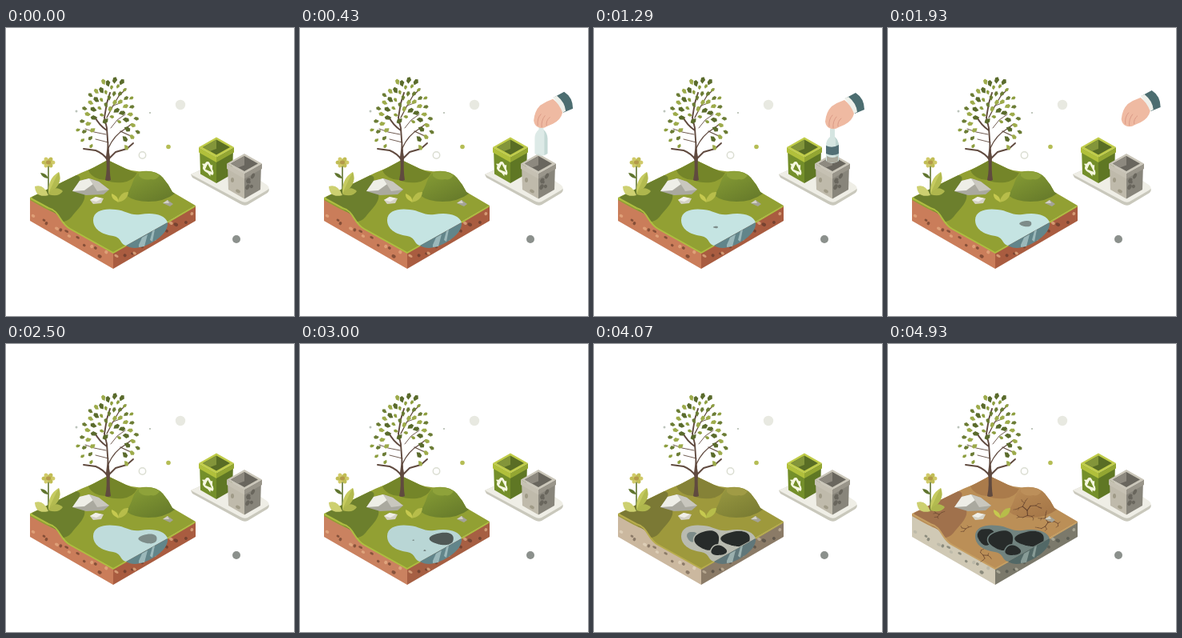
Animation of 360x360 px, one loop 5 s. Source, as an HTML page with a canvas:

```html
<!DOCTYPE html>
<html lang="en">
<head>
<meta charset="utf-8">
<title>Polluted ground</title>
<style>
html, body { margin: 0; width: 100%; height: 100%; overflow: hidden; background: #fff; }
canvas { display: block; width: 360px; height: 360px; }
</style>
</head>
<body>
<canvas id="stage" width="360" height="360"></canvas>
<script>
const ctx = document.getElementById('stage').getContext('2d');
const LOOP = 5000, STEPS = 70, TAU = Math.PI * 2;

const clamp = v => Math.max(0, Math.min(1, v));
const ramp = (t, a, b) => clamp((t - a) / (b - a));
const ease = v => v * v * (3 - 2 * v);
const lerp = (a, b, k) => a + (b - a) * k;

function seeded(seed) {
  return () => (seed = seed * 16807 % 2147483647) / 2147483647;
}

function mix(a, b, k) {
  const part = (c, i) => parseInt(c.slice(i, i + 2), 16);
  return '#' + [1, 3, 5].map(i =>
    Math.round(lerp(part(a, i), part(b, i), k)).toString(16).padStart(2, '0')).join('');
}

// Colour going from healthy through fading to dead
function decay(t, fresh, fading, dead, from = 3400) {
  return t < 4070 ? mix(fresh, fading, ramp(t, from, 4070)) : mix(fading, dead, ramp(t, 4070, 4850));
}

function fill(d, color) {
  ctx.fillStyle = color;
  ctx.fill(new Path2D(d));
}

function line(d, color, width) {
  ctx.strokeStyle = color;
  ctx.lineWidth = width;
  ctx.lineCap = ctx.lineJoin = 'round';
  ctx.stroke(new Path2D(d));
}

function oval(x, y, rx, ry, color, turn = 0) {
  ctx.fillStyle = color;
  ctx.beginPath();
  ctx.ellipse(x, y, rx, ry, turn, 0, TAU);
  ctx.fill();
}

const TOP = 'M30 212 L94 181 Q112 174 127 165 L150 176 Q160 180 170 179 Q187 177 196 187 Q203 195 208 205 L237 222 L134 281 L80 251 C70 245 70 234 61 231 Q52 228 30 215 Z';
const LEFT = 'M30 213 L53 225 C68 229 66 243 80 251 L134 281 V301 L30 241 Z';
const RIGHT = 'M134 281 L237 222 V241 L134 301 Z';
const POND = 'M109 240 C109 228 124 225 137 227 C150 228 155 235 168 233 C183 230 199 233 202 243 L150 272 C142 270 145 262 134 260 C119 258 109 251 109 240 Z';
const GLASS = 'M150 272 L202 243 C203 252 195 260 186 266 C173 274 160 278 150 272 Z';

const SLICKS = [
  { x: 121, y: 240, rx: 12, ry: 12, grow: [2950, 4850], dark: [4070, 4700] },
  { x: 141, y: 245, rx: 17, ry: 14, grow: [2700, 4100], dark: [3500, 4000] },
  { x: 179, y: 243, rx: 20, ry: 11, grow: [1130, 3450], dark: [2500, 3450] },
  { x: 156, y: 259, rx: 11, ry: 7.5, grow: [2700, 3700], dark: [2800, 3400] }
];

function drawPebbles(t, x0, x1, dark, pale, seed) {
  const random = seeded(seed);
  for (let i = 0; i < 13; i++) {
    const x = lerp(x0 + 4, x1 - 4, (i + random()) / 13);
    const y = 301 - Math.abs(x - 134) * .58 - 4 - random() * 12;
    oval(x, y, 1.5 + 1.5 * random(), 1.3 + random(), i % 3 ? dark : pale, .5);
  }
}

function drawSoil(t) {
  const soil = (...colors) => decay(t, ...colors, 2900);
  fill(LEFT, soil('#ca7d5a', '#cbb89f', '#d0c9b5'));
  fill(RIGHT, soil('#a95c40', '#8b7b67', '#7b796b'));
  drawPebbles(t, 30, 134, soil('#854f38', '#8b7a68', '#8c8c7e'), soil('#dfa078', '#ddceb7', '#bdbaa9'), 71);
  drawPebbles(t, 134, 237, soil('#774331', '#62594d', '#5c5e54'), soil('#d59a74', '#b6a68f', '#a7a594'), 29);
}

function drawGrass(t) {
  fill(TOP, decay(t, '#92a033', '#9e993c', '#bb8f57'));
  const mound = decay(t, '#6c7f2d', '#7b7935', '#a0714c');
  fill('M33 211 L88 184 C99 187 85 194 96 203 C104 215 90 225 82 236 Q77 242 70 242 C66 231 55 228 33 215 Z', mound);
  fill('M103 178 L127 165 L150 176 Q158 180 164 181 Q159 191 146 193 Q133 194 124 190 Q108 189 103 178 Z',
    decay(t, '#748529', '#858237', '#aa7b4b'));
  const hill = ctx.createLinearGradient(168, 178, 187, 219);
  hill.addColorStop(0, decay(t, '#849a34', '#969640', '#b88a55'));
  hill.addColorStop(1, decay(t, '#687c2b', '#7b7d33', '#a67748'));
  ctx.fillStyle = hill;
  ctx.fill(new Path2D('M150 209 C159 200 158 181 170 180 Q187 177 196 187 Q203 195 208 205 L211 207 Q198 217 178 217 Q160 217 150 209 Z'));
  fill('M166 181 Q180 177 192 184 Q188 191 181 189 Q172 191 166 185 Z', decay(t, '#8ea23a', '#a09b45', '#bc8f5a'));
  const lip = decay(t, '#aebe40', '#b8ad4c', '#c7a063');
  line('M31 213 L53 225 C68 229 66 243 80 251 L134 281 L150 272', lip, 2);
  line('M202 243 L236 223', lip, 1.6);
}

function drawCrack(x, y, angle, length, random) {
  if (length < 3) return;
  const bend = angle + (random() - .5) * 1.2;
  const endX = x + Math.cos(bend) * length, endY = y + Math.sin(bend) * length * .7;
  line(`M${x} ${y} L${endX} ${endY}`, '#65432e', length / 11 + .25);
  drawCrack(endX, endY, bend + .5, length * .75, random);
  if (random() < .65) drawCrack(endX, endY, bend - .9, length * .62, random);
}

function drawCracks(t) {
  const random = seeded(83);
  ctx.globalAlpha = ramp(t, 4150, 4850);
  for (const [x, y, length] of [[174, 208, 9], [200, 223, 8], [119, 264, 6], [97, 231, 5], [64, 213, 5]])
    for (let arm = 0; arm < 3; arm++) drawCrack(x, y, arm * TAU / 3 - .5, length, random);
  ctx.globalAlpha = 1;
}

function drawSlick(t, s, water) {
  const grown = ramp(t, ...s.grow);
  if (!grown) return;
  const first = s.grow[0] < 2000;
  const size = first ? lerp(.14, 1, grown) : ease(grown);
  const drift = first ? 1 - ease(ramp(t, 1290, 2200)) : 0;
  ctx.beginPath();
  for (let a = 0; a < TAU; a += TAU / 36) {
    const r = size * (1 + .07 * Math.cos(3 * a + s.x));
    ctx.lineTo(s.x - 27 * drift + s.rx * r * Math.cos(a), s.y + 6 * drift + s.ry * r * Math.sin(a));
  }
  ctx.closePath();
  ctx.fillStyle = mix('#7d8c89', '#272b2a', ramp(t, ...s.dark));
  ctx.strokeStyle = water;
  ctx.lineWidth = 1.6;
  ctx.fill();
  ctx.stroke();
}

function drawPond(t) {
  const clean = mix('#c5e4e2', '#b5d1d0', ramp(t, 1900, 3400));
  const water = decay(t, clean, '#b9bbb0', '#71837f');
  fill(POND, water);
  ctx.save();
  ctx.translate(155, 248);
  ctx.scale(.95, .92);
  ctx.translate(-155, -248);
  ctx.clip(new Path2D(POND));
  SLICKS.forEach(s => drawSlick(t, s, water));
  ctx.restore();
  fill(GLASS, decay(t, '#62858a', '#60777a', '#526866'));
  const shine = decay(t, '#9bb8ba', '#9bb0ae', '#879b96');
  fill('M166 271 L170 262 L177 258 L173 273 L166 274 Z', shine);
  fill('M180 265 L183 254 L186 252 L183 267 Z', shine);
}

function drawStones() {
  fill('M83 204 L92 191 L104 188 L116 192 L129 202 L122 208 L100 209 Z', '#aaa99f');
  fill('M83 204 L92 191 L104 188 L109 195 L98 203 Z', '#eeeee7');
  fill('M104 188 L116 192 L129 202 L114 204 Z', '#c9c7be');
  fill('M105 215 L112 211 L122 213 L119 219 L109 220 Z', '#d5d2c5');
  fill('M105 215 L112 211 L120 213 L113 217 Z', '#f0efe7');
  fill('M196 219 L202 215 L209 220 L205 223 Z', '#a4a398');
  fill('M196 219 L202 215 L204 219 Z', '#d3d1c4');
}

function drawPlants() {
  fill('M139 217 Q131 213 132 207 Q139 209 141 217 Z', '#c6c94f');
  fill('M139 218 Q143 204 153 205 Q152 216 139 218 Z', '#b7bd4a');
  line('M53 208 V169', '#60732e', 1.6);
  fill('M52 188 Q45 187 43 181 Q50 181 53 188 Z', '#60752e');
  fill('M53 207 Q52 188 66 180 Q72 196 53 207 Z', '#c6cb60');
  fill('M53 207 Q62 187 66 180 Q72 196 53 207 Z', '#b3bb50');
  fill('M53 209 Q37 213 36 198 Q47 194 53 209 Z', '#cdd070');
  fill('M53 208 Q61 195 71 204 Q66 212 53 208 Z', '#aeb64d');
  for (let i = 0; i < 6; i++) {
    const a = i * TAU / 6;
    oval(53 + 5 * Math.cos(a), 168 + 3.7 * Math.sin(a), 3.4, 2.6, i % 2 ? '#c1bd55' : '#d0ca69', a);
  }
  oval(53, 168, 3, 2.4, '#b39a4b');
}

function drawLeaf(x, y, size, angle, color) {
  ctx.save();
  ctx.translate(x, y);
  ctx.rotate(angle);
  ctx.scale(size, size * .8);
  fill('M-1.1 0 L-.3 -.9 L.8 -.7 L1.1 .3 L.2 1 Z', color);
  ctx.restore();
}

function drawTree() {
  const bark = '#604a3f';
  fill('M124 190 Q127 177 125 161 L127 145 L130 161 Q129 179 131 190 Q127 192 124 190 Z', bark);
  line('M127 165 Q122 157 112 153 L97 151 M128 164 L137 155 L151 151 L159 144', bark, 1.9);
  line('M128 154 L126 125 L123 112 L126 94 L130 81 M126 128 Q116 121 111 111', bark, 1.9);
  line('M128 150 Q135 134 149 126 L157 120 M126 112 Q133 98 141 85 L150 76 M143 129 L158 136', bark, 1.3);
  line('M134 97 L145 93 M125 133 L110 130 L99 126 M128 143 L112 139 M131 125 L139 115 L149 108', bark, .9);
  // Even spiral over a crown that widens downwards and is bare around the fork
  const greens = ['#8d9e3f', '#6b7c35', '#9dab4b', '#5a6b2c'], count = 68;
  for (let i = 0; i < count; i++) {
    const a = i * 2.39996, r = Math.sqrt((i + .5) / count);
    const down = r * Math.sin(a);
    const x = 129 - 4 * down + r * Math.cos(a) * (37 + 12 * down);
    const y = 111 + 50 * down;
    if (y > 118 && Math.abs(x - 127) < 18) continue;
    drawLeaf(x, y, 2.7 + i * 7 % 4 * .4, a, greens[i * 3 % 4]);
  }
}

function drawRecycle() {
  ctx.save();
  ctx.transform(1.05, .53, 0, 1.18, 252.8, 175.5);
  for (let i = 0; i < 3; i++) {
    ctx.rotate(TAU / 3);
    line('M-5.2 2.5 L-2 -4.3 Q0 -7 2 -4.3', '#f5f7df', 2.5);
    fill('M.2 -3.5 L5.1 -5.8 L4.7 .3 Z', '#f5f7df');
  }
  ctx.restore();
}

// Open isometric box centred on its rim
function drawBin(x, y, bottom, c) {
  const w = 22, h = 12.5, rim = 6.5, base = bottom - y - h;
  const poly = (color, ...points) =>
    fill('M' + points.map(([dx, dy]) => `${x + dx} ${y + dy}`).join('L') + 'Z', color);
  for (const [side, face, band] of [[-1, c.left, c.rimLeft], [1, c.right, c.rimRight]]) {
    poly(face, [side * (w - 1), 1], [0, h], [0, h + base], [side * (w - 2), base + 1]);
    poly(band, [side * w, 0], [0, h], [0, h + rim], [side * w, rim]);
  }
  poly(c.top, [-w, 0], [0, -h], [w, 0], [0, h]);
  poly(c.deep, [-w + 5, 0], [0, 3 - h], [w - 5, 0], [0, h - 3]);
  poly(c.inside, [-w + 5, 0], [0, 3 - h], [0, 2], [-8, 5]);
}

function drawBins() {
  fill('M231 183 L275 163 L326 197 Q331 202 327 206 L302 221 Q298 223 293 220 L233 187 Z', '#c9c8bc');
  fill('M231 183 L275 163 L326 196 Q331 200 326 203 L302 217 Q298 219 293 216 Z', '#efeee6');
  drawBin(263, 149, 194, { left: '#748f2a', right: '#5f7724', rimLeft: '#b1c03b', rimRight: '#93a632',
    top: '#c0cc49', deep: '#596d25', inside: '#83953a' });
  drawRecycle();
  drawBin(298, 169.5, 213.5, { left: '#bfbaab', right: '#88857b', rimLeft: '#c6c1b3', rimRight: '#99958a',
    top: '#cac6b9', deep: '#69665e', inside: '#8d897f' });
  const random = seeded(17);
  for (let i = 0; i < 6; i++) {
    const dx = 3 + random() * 12;
    oval(299 + dx, 204 - dx * .5 - random() * 16, 1.5 + random(), 2 + random() * 2, '#69665d', .5);
  }
  oval(283, 190, 2, 3, '#9f9a87');
  oval(290, 204, 3, 2, '#9f9a87', .5);
}

function drawBottle(t) {
  const drop = ramp(t, 1400, 1790);
  if (drop >= 1) return;
  const lower = ease(ramp(t, 430, 1140));
  ctx.save();
  ctx.clip(new Path2D('M270 80 H330 V162 L298 178 L270 164 Z'));
  ctx.globalAlpha = ramp(t, 140, 500);
  ctx.translate(lerp(3, 0, lower) + 13 * (1 - ease(ramp(t, 0, 480))), lerp(-9, 0, lower) + 55 * drop * drop);
  fill('M295 126 H301 V136 Q306 141 306 147 V166 Q298 172 290 166 V147 Q290 140 295 136 Z', '#d5e5e1');
  fill('M301 136 Q306 141 306 147 V166 L302 168 V140 Z', '#bed5d1');
  ctx.globalAlpha *= ramp(t, 430, 850);
  fill('M290 147 Q298 151 306 146 V157 Q298 161 290 157 Z', '#526f75');
  fill('M291 160 Q298 164 305 160 V167 Q298 170 291 167 Z', '#aaa99c');
  ctx.restore();
}

function drawHand(t) {
  const away = 1 - ease(ramp(t, 0, 520)) + ease(ramp(t, 1760, 2360));
  ctx.save();
  ctx.globalAlpha = ramp(t, 40, 300) * (1 - ramp(t, 2080, 2360));
  ctx.translate(14 * away + 2 * (1 - ramp(t, 430, 1140)), -16 * away);
  fill('M314 88 L327 81 Q338 88 338 102 L326 107 Q323 96 314 88 Z', '#4c6d70');
  fill('M313 88 L318 86 Q328 94 329 105 L323 108 Q321 97 313 88 Z', '#eef0ea');
  fill('M313 90 Q304 93 297 98 Q290 105 289 117 Q290 123 294 125 Q300 128 306 124 L313 121 Q323 116 325 107 Q321 96 313 90 Z', '#efbaa2');
  line('M294 123 Q293 114 298 109 M299 125 Q298 117 303 111 M305 123 Q304 117 309 113', '#d89783', .9);
  ctx.restore();
}

function drawDots() {
  oval(218, 96, 6.2, 6.2, '#e8e9e1');
  oval(203, 148.5, 2.8, 2.8, '#b5bd55');
  oval(288, 264, 5, 5, '#8b908c');
  oval(88, 104, 1.5, 1.5, '#bcc4bb');
  oval(180, 106, 1, 1, '#aeb7a9');
  ctx.strokeStyle = '#dbded2';
  ctx.lineWidth = 1.5;
  ctx.beginPath();
  ctx.arc(170.5, 159, 4.2, 0, TAU);
  ctx.stroke();
}

function draw(now) {
  const step = LOOP / STEPS;
  const t = Math.floor((now % LOOP) / step + .01) * step;
  ctx.fillStyle = '#fff';
  ctx.fillRect(0, 0, 360, 360);
  drawDots();
  drawSoil(t);
  drawGrass(t);
  drawCracks(t);
  drawPond(t);
  drawStones();
  drawPlants();
  drawTree();
  drawBins();
  drawBottle(t);
  drawHand(t);
}

const start = performance.now();
function tick() {
  draw(performance.now() - start);
  requestAnimationFrame(tick);
}
tick();
</script>
</body>
</html>
```
